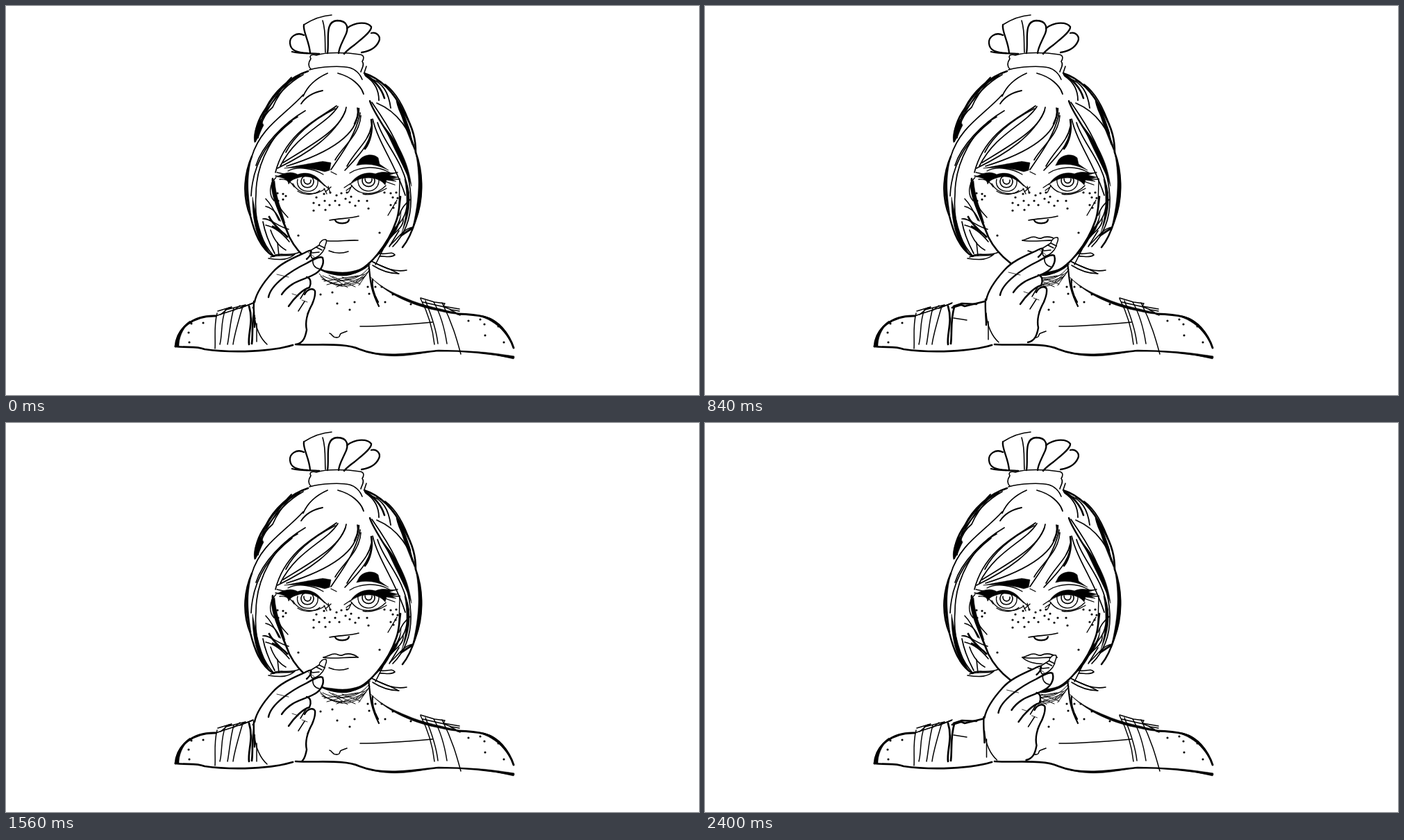
Write an HTML page that moves like this. It is 998 px wide and 561 px high and loops after 2520 ms.

```html
<!DOCTYPE html>
<html lang="en">
<head>
<meta charset="utf-8">
<title>Lipstick</title>
<style>
html, body { margin: 0; width: 100%; height: 100%; overflow: hidden; background: #fff; }
svg { display: block; width: 100%; height: 100%; }
path { fill: none; stroke: #000; stroke-linecap: round; stroke-linejoin: round; }
path.solid { fill: #000; stroke-width: .5; }
path.paper { fill: #fff; stroke: none; }
</style>
</head>
<body>
<svg viewBox="0 0 998 561">
  <defs>
    <clipPath id="upperClip"><rect id="upperRect" x="450" y="325" height="50"/></clipPath>
    <clipPath id="lowerClip"><rect id="lowerRect" x="450" y="325" height="50"/></clipPath>
  </defs>
  <g id="body"></g>
  <g id="upper" clip-path="url(#upperClip)"></g>
  <g id="lower" clip-path="url(#lowerClip)"></g>
  <g id="hand"></g>
  <g id="front"></g>
</svg>
<script>
const byId = id => document.getElementById(id);

function add(layer, d, attrs) {
  const path = document.createElementNS('http://www.w3.org/2000/svg', 'path');
  path.setAttribute('d', d);
  for (const name in attrs) path.setAttribute(name, attrs[name]);
  byId(layer).append(path);
}
const ink = (layer, width, ...lines) =>
  lines.forEach(d => add(layer, d, { 'stroke-width': width }));
const solid = (layer, ...shapes) => shapes.forEach(d => add(layer, d, { class: 'solid' }));
const dots = (width, spots) =>
  ink('body', width, spots.trim().split(/\s+/).map(p => `M${p}h.01`).join(''));

// Bun and its band
ink('body', 2.3,
  'M429 42C419 37 408 44 409 54C410 65 420 67 434 68',
  'M429 27C427 36 437 51 438 68',
  'M463 68C466 50 458 22 477 21C493 21 494 33 488 44C484 53 480 59 479 68',
  'M491 32C505 22 521 23 526 30C527 37 510 49 502 56C495 61 490 65 487 69',
  'M526 39C535 37 540 45 537 51C533 60 525 65 512 67',
  'M412 66C425 69 438 68 451 69');
ink('body', 1.6,
  'M429 27C440 20 455 14 469 13', 'M456 21C461 37 459 53 460 67',
  'M439 91C433 85 437 79 439 76C436 71 441 69 447 71C461 66 491 67 510 70C517 71 515 77 513 80C517 85 512 90 511 95',
  'M437 92C455 87 482 86 495 89C503 91 510 98 513 106', 'M519 87L516 96');

// Crown and side hair
ink('body', 1.8,
  'M463 97C445 105 434 116 428 130', 'M456 122C441 125 431 132 425 141',
  'M478 97C497 102 511 114 515 127', 'M518 101C533 111 537 123 537 136',
  'M428 99C402 113 387 135 372 154C366 166 365 176 363 190',
  'M411 103C394 120 382 142 368 164', 'M428 128C401 158 367 174 354 217',
  'M411 106C402 116 390 132 384 146C374 154 369 165 367 173',
  'M523 104C543 110 551 125 554 147', 'M534 107C556 119 567 139 573 159',
  'M546 113C561 124 574 147 583 174', 'M566 143C569 157 581 176 585 199');
ink('body', 2.6,
  'M435 94C409 102 386 124 374 148C362 165 358 180 359 195',
  'M516 97C541 105 560 127 573 153C587 177 590 194 590 211',
  'M423 101C403 109 384 130 374 149', 'M517 99C530 106 541 119 545 133',
  'M563 137C567 158 577 165 582 184');
solid('body',
  'M366 163C358 176 356 188 358 197C364 191 366 181 371 172Z',
  'M564 139C574 153 581 174 588 207C581 191 571 167 564 139Z');

// Fringe and long locks
ink('body', 1.7,
  'M476 144C458 158 403 180 388 240', 'M478 145C462 171 419 183 395 231',
  'M490 146C485 177 439 201 399 226', 'M489 151C473 187 436 212 391 234',
  'M506 147C512 184 465 212 404 231', 'M510 154C504 186 484 212 468 236',
  'M511 158C509 187 485 202 474 222', 'M526 164C531 191 513 211 488 237',
  'M526 174C522 196 504 207 491 231', 'M528 163C536 197 562 231 575 273',
  'M535 168C544 199 573 222 580 270', 'M527 139C545 165 580 214 583 276C584 308 573 331 557 347',
  'M534 140C565 153 583 181 590 211', 'M420 160C388 176 360 224 360 272C357 311 367 340 386 361',
  'M412 166C381 190 355 224 353 274', 'M431 151C400 169 369 201 360 230',
  'M474 148C443 164 417 184 403 211', 'M370 311C373 328 379 342 387 357');
ink('body', 2.5, 'M354 217C342 245 341 277 352 303C358 327 366 349 385 361',
  'M590 211C602 244 600 282 590 308C585 325 580 337 571 348',
  'M508 148C508 158 505 163 502 170', 'M526 164C529 180 524 197 517 206',
  'M524 137C528 151 545 174 559 199');
solid('body',
  'M355 214C345 239 341 273 353 302C347 264 347 244 355 214Z',
  'M355 276C354 315 365 348 381 359C366 332 361 306 355 276Z',
  'M590 212C602 247 601 291 584 326C595 281 597 249 590 212Z',
  'M574 250C585 269 583 298 570 327C579 296 578 269 574 250Z',
  'M545 174C565 198 580 226 584 260C575 234 558 206 545 174Z');

// Ears and loose ends
ink('body', 1.6,
  'M374 278C382 286 387 296 393 309', 'M374 289C386 292 391 301 395 310',
  'M370 307C379 305 391 318 407 322', 'M374 316C388 319 399 329 408 340',
  'M381 323C386 338 394 347 403 352', 'M391 341L393 360',
  'M582 279C575 286 570 290 566 302', 'M577 291C574 307 566 315 558 322',
  'M572 307C573 317 563 325 554 333', 'M586 319C572 321 565 335 553 345',
  'M566 324L552 347', 'M378 364C397 367 407 366 416 358',
  'M386 360C395 355 406 362 423 355', 'M381 362C395 358 405 361 414 359',
  'M538 357C548 359 556 353 560 359C553 364 545 360 538 361',
  'M526 368C540 374 555 385 577 381', 'M528 374C542 383 553 386 566 386',
  'M530 370C544 377 554 379 565 386', 'M543 351L532 373');
ink('body', 2.8, 'M379 304C383 313 391 319 398 327', 'M584 321L569 331',
  'M384 318C391 321 399 326 405 333');

// Face outline
ink('body', 2.6, 'M384 249C383 280 398 307 408 333C416 349 426 360 439 370C450 380 466 387 484 388C507 388 523 373 535 358C548 342 557 325 562 310C566 300 566 290 568 275');
ink('body', 1.4, 'M389 247C379 257 378 272 386 281', 'M567 249L566 291', 'M390 279C394 294 401 299 406 305',
  'M386 266C388 289 402 311 408 334', 'M563 280L550 302');
solid('body', 'M382 255C382 277 393 299 402 313C396 292 388 272 387 252Z',
  'M455 381C475 392 507 391 525 372C507 383 489 386 472 383Z',
  'M569 296C568 313 557 323 549 340C559 331 569 316 569 296Z',
  'M560 318C554 332 545 346 528 366C541 356 553 342 560 318Z');

// Brows, eyes, nose
solid('body',
  'M401 234C421 230 445 226 456 224L468 226L466 237L459 239C442 234 423 232 401 234Z',
  'M509 222C516 213 530 213 536 219L538 228L551 237C535 229 520 226 505 230Z',
  'M390 246C401 240 412 238 420 243C438 237 450 246 459 260C447 248 435 243 420 248C413 250 410 252 407 257C406 250 400 248 390 246Z',
  'M495 258C503 244 518 238 532 242C542 238 550 240 559 241L552 244L565 247L554 249L562 253L548 251L546 258C537 246 512 243 495 258Z');
ink('body', 1.3,
  'M388 245L412 249', 'M390 240L412 245', 'M394 250C405 249 411 254 415 261',
  'M406 238C421 230 444 235 457 243', 'M495 241C511 231 535 230 552 240',
  'M413 256C421 272 444 275 459 264', 'M420 267C433 275 446 271 452 266',
  'M497 258C510 276 534 273 547 259', 'M514 271C525 274 540 268 548 263',
  'M545 244L564 240', 'M547 249L567 250', 'M546 253L560 258',
  'M420 250C415 271 451 274 449 252', 'M507 250C505 272 538 273 537 250',
  'M454 254L465 264M458 263L462 271M464 260L467 270M460 268L468 261',
  'M487 262L496 256M490 266L497 261M493 269L498 259', 'M468 239L476 243');
ink('body', 1.6, 'M425 252C424 265 444 265 443 252C442 242 426 242 425 252Z',
  'M513 251C513 264 532 263 531 251C529 241 514 242 513 251Z',
  'M429 250C428 259 440 259 439 251', 'M517 249C517 258 528 257 527 249');
ink('body', 1.6, 'M466 309C480 306 494 307 508 303');
ink('body', 2.2, 'M474 309C477 315 493 315 494 308');
dots(3.2, `391,270 399,271 392,281 399,279 403,274 443,284 447,276 443,295 451,287
 458,271 459,281 460,294 466,287 467,269 474,281 476,273 480,287 483,270 489,278
 491,269 495,283 497,275 503,288 508,281 520,281 522,292 545,269 554,270 562,269
 557,276 564,277 561,284 554,287 558,291 421,331 538,327`);

// Lips: base lines, then the parts painted in
ink('body', 1.6, 'M457 338C472 341 491 337 507 338');
ink('body', 1.5, 'M465 353C474 357 484 357 493 354');
ink('upper', 1.6, 'M457 338C464 337 467 333 473 333C478 333 480 336 484 335C492 331 501 333 507 338');
ink('lower', 1.5, 'M457 338C464 345 477 348 488 347C498 346 504 342 507 338');

// Neck and torso
ink('body', 1,
  'M451 386C468 408 505 414 523 381', 'M453 390C468 405 502 407 518 388',
  'M456 389C475 399 504 401 523 377', 'M458 397L507 389M462 402L516 387M470 390L503 405',
  'M465 388L492 406M484 391L510 401M476 405L515 391M455 394L484 404',
  'M504 397L522 383M508 403L524 380');
ink('body', 2.2, 'M522 371C525 391 523 405 537 433', 'M528 394C526 405 531 418 536 427');
solid('body', 'M524 390C546 413 580 431 620 439C642 444 651 445 655 444C629 437 602 433 575 421C551 411 539 404 524 390Z');
ink('body', 1.6, 'M510 462C545 462 580 459 614 456',
  'M466 472C470 473 470 478 475 478C483 479 479 473 483 472L491 469');
ink('body', 2.9, 'M244 491C246 465 269 446 302 447', 'M650 444C680 445 700 447 715 465C724 475 728 484 731 493');
solid('body', 'M244 491C244 476 252 463 265 454C253 468 249 479 249 491Z',
  'M678 446C702 446 722 464 731 493C723 477 711 455 678 446Z');
ink('body', 1.5,
  'M302 447C323 440 342 434 355 429', 'M304 443C299 462 302 478 301 494',
  'M316 438C309 455 312 472 308 488', 'M328 436C323 453 322 472 319 488',
  'M341 433C335 453 329 473 327 488', 'M305 440L325 434L317 438L345 431L337 436L356 428',
  'M309 445L321 435M328 439L337 432', 'M358 450L377 453',
  'M597 422C610 447 615 470 617 488', 'M604 425C613 447 620 469 622 487',
  'M616 427C629 450 633 474 635 487', 'M628 428C643 458 649 480 655 502',
  'M597 421L617 427L632 429L630 433L653 437', 'M600 427L631 434L641 438L653 440',
  'M640 438L654 446');
ink('body', 2.7, 'M350 433C357 455 348 472 350 488', 'M359 434C353 455 356 472 354 487',
  'M356 435L369 431L374 433L403 426', 'M358 433L370 429L391 430');
dots(3.1, `453,416 470,413 477,429 495,438 502,427 521,405 523,415 532,405 532,420
 541,405 546,427 557,416 583,430 666,454 683,452 689,459 709,462 690,475 717,485
 284,457 267,458 263,471 264,485`);

// Hand with lipstick
add('hand', 'M357 428C362 410 376 392 386 382C401 367 422 359 436 353L450 343L456 337L462 337L461 345L455 357L457 366C456 379 448 386 437 391C440 397 439 403 437 409C443 405 446 410 445 416C443 432 432 452 433 467C432 478 428 487 418 493L376 491C366 477 359 460 357 428Z', { class: 'paper' });
ink('hand', 2.4,
  'M358 427C361 411 375 394 384 384C397 369 420 361 434 354C443 349 440 359 433 365',
  'M378 420C381 402 410 382 433 371C443 365 452 360 456 363C459 373 453 383 442 388C427 396 410 397 397 416',
  'M433 391C439 392 440 400 437 406C428 408 415 421 407 433',
  'M430 416C434 408 442 406 445 411C446 419 443 424 441 430C432 446 431 458 433 467C431 478 428 486 418 488',
  'M357 426C356 441 358 453 358 463');
ink('hand', 1.5,
  'M438 353L451 345L459 349C456 357 449 363 441 364C438 361 439 356 438 353Z',
  'M451 345C452 339 457 336 461 337C463 341 459 344 459 349',
  'M441 356L451 355M447 348L455 352', 'M442 366C441 373 445 378 451 379',
  'M433 407L424 422M421 440L430 426', 'M442 427L434 444',
  'M358 446C359 465 367 480 376 488', 'M361 458L361 484');
ink('hand', .8, 'M390 387L407 391M412 415L421 418M426 424L434 427M435 355L444 362');

// Lower edge covers the wrist
add('front', 'M360 496L405 492L418 489L480 490L500 495V510H360Z', { class: 'paper' });
ink('front', 2.7, 'M244 491C261 493 274 490 286 495C329 501 384 498 413 489',
  'M417 488C450 490 487 485 509 495C544 509 585 501 623 497C665 497 699 501 731 507');
solid('front', 'M512 496C542 507 575 502 613 498C574 507 540 508 512 496Z',
  'M660 498C690 498 711 502 732 505L731 509C709 504 688 500 660 498Z');

const STEP = 120, STEPS = 21;
// Hand offset: step, x, y
const poses = [[0, 0, 0], [2, 14.5, -3], [5, 32.5, -3], [7, 47, -3], [9, 59, -3],
  [10, 51, -1], [12, 13, 4], [13, 0, 4], [15, 12, 0], [20, 44.5, -2]];

function poseAt(step) {
  const next = poses.findIndex(p => p[0] >= step);
  if (next === 0) return [0, 0];
  const a = poses[next - 1], b = poses[next];
  const k = (step - a[0]) / (b[0] - a[0]);
  return [1, 2].map(i => a[i] + (b[i] - a[i]) * k);
}

function draw(time) {
  const step = Math.floor(time / STEP) % STEPS;
  const [x, y] = poseAt(step);
  byId('hand').setAttribute('transform', `translate(${x} ${y})`);
  byId('upperRect').setAttribute('width', step > 9 ? 70 : x + 6);
  byId('lowerRect').setAttribute('width', step > 13 ? x + 6 : 0);
}

const start = performance.now();
function tick() {
  draw(performance.now() - start);
  requestAnimationFrame(tick);
}
tick();
</script>
</body>
</html>
```
